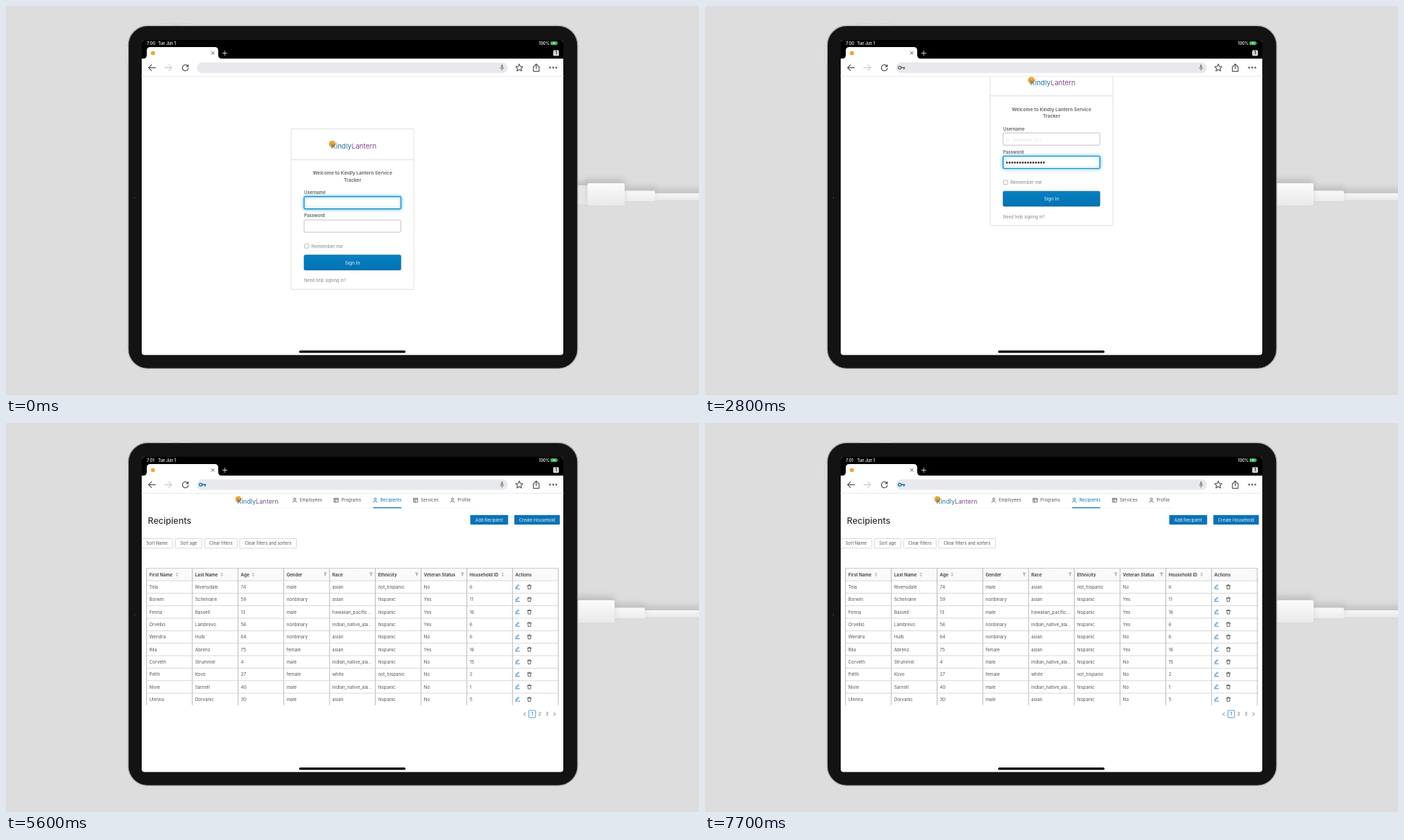
Write an HTML page with a canvas that moves like this. It is 960 px wide and 540 px high and loops after 8 s.

```html
<!DOCTYPE html>
<html lang="en">
<head>
<meta charset="utf-8">
<title>Tablet sign-in and recipients table</title>
<style>
  html, body { margin: 0; width: 100%; height: 100%; overflow: hidden; background: #ddd; }
  canvas { display: block; width: 960px; height: 540px; }
</style>
</head>
<body>
<canvas id="stage" width="960" height="540"></canvas>
<script>
const ctx = document.getElementById('stage').getContext('2d');
const LOOP = 8000, STEP = 700;
const BLUE = '#0b72b5', ORANGE = '#eda63a';

const listed = `Tela Rivensdale 74 male asian not_hispanic No 6
Borwin Schelvane 59 nonbinary asian hispanic Yes 11
Fenna Basvell 13 male hawaiian_pacific... hispanic Yes 16
Orvellio Lambrevo 56 nonbinary indian_native_ala... hispanic Yes 6
Wendra Hulb 64 nonbinary asian hispanic No 6
Rila Abrenz 75 female asian hispanic Yes 16
Corveth Strummel 4 male indian_native_ala... hispanic No 15
Pelth Kovo 27 female white not_hispanic No 2
Nivie Sarnell 40 male indian_native_ala... hispanic No 1
Ulenna Dorvanic 30 male asian hispanic No 5`;
const byLastName = `Rila Abrenz 75 female asian hispanic Yes 16
Keld Acrenthey 121 male white hispanic Yes 11
Fenna Basvell 13 male hawaiian_pacific... hispanic Yes 16
Ombric Basvell 5 male indian_native_ala... hispanic No 9
Marivanna Botrund 54 male indian_native_ala... not_hispanic No 19
Zarnny Celk 80 female white hispanic Yes 2
Dovlings Corvane 13 male asian not_hispanic No 17
Ulenna Dorvanic 30 male asian hispanic No 5
Ombric Dulloway 17 male white not_hispanic No 21
Teov Durvik 114 male white not_hispanic Yes 9`;

function box(x, y, w, h, fill, r = 0, stroke, lw = 1) {
  ctx.beginPath();
  ctx.roundRect(x, y, w, h, r);
  if (fill) { ctx.fillStyle = fill; ctx.fill(); }
  if (stroke) { ctx.strokeStyle = stroke; ctx.lineWidth = lw; ctx.stroke(); }
}

// y is the middle of the capital letters
function text(s, x, y, size, color = '#555', align = 'left', weight = 400) {
  ctx.font = `${weight} ${size}px Inter, "Liberation Sans", sans-serif`;
  ctx.textAlign = align;
  ctx.fillStyle = color;
  ctx.fillText(s, x, y + size * 0.36);
  return ctx.measureText(s).width;
}

function icon(x, y, d, color, lw = 1, filled = false) {
  ctx.save();
  ctx.translate(x, y);
  const path = new Path2D(d);
  ctx.strokeStyle = ctx.fillStyle = color;
  ctx.lineWidth = lw;
  ctx.lineCap = ctx.lineJoin = 'round';
  if (filled) ctx.fill(path); else ctx.stroke(path);
  ctx.restore();
}

function line(x1, y1, x2, y2, color, lw = 1) {
  icon(0, 0, `M${x1} ${y1}L${x2} ${y2}`, color, lw);
}

function dot(x, y, r, color) {
  ctx.beginPath();
  ctx.arc(x, y, r, 0, 7);
  ctx.fillStyle = color;
  ctx.fill();
}

function shade(y, h, top, bottom) {
  const g = ctx.createLinearGradient(0, y, 0, y + h);
  g.addColorStop(0, top);
  g.addColorStop(1, bottom);
  return g;
}

function clipped(x, y, w, h, draw) {
  ctx.save();
  ctx.beginPath();
  ctx.rect(x, y, w, h);
  ctx.clip();
  draw();
  ctx.restore();
}

function brand(x, y, size) {
  dot(x + 1.5, y - 3, size * 0.5, ORANGE);
  const w = text('Kindly', x, y, size, '#28719f');
  text('Lantern', x + w, y, size, '#7c4d86');
}

function cable(shift) {
  ctx.save();
  ctx.translate(-shift, 0);
  ctx.shadowColor = 'rgba(0,0,0,.13)';
  ctx.shadowBlur = 8;
  ctx.shadowOffsetY = -6;
  box(896, 260, 90, 9.5, shade(260, 10, '#f6f6f6', '#e9e9e9'));
  box(855, 256.5, 44, 14.5, shade(256, 15, '#fafafa', '#ececec'), 1.5);
  box(780, 249, 28, 26, '#e6e6e6');
  box(805.5, 246, 51.5, 31, shade(246, 31, '#fbfbfb', '#e9e9e9'), 2);
  ctx.restore();
}

function tablet() {
  for (const x of [213, 240]) box(x, 25, 19, 4, '#e9e9e9', 1, '#c4c4c4', 0.6);
  box(166.3, 55, 4, 25, '#e9e9e9', 1, '#c4c4c4', 0.6);
  box(169.3, 27.3, 622.6, 476, '#131313', 27, '#a6a6a6', 1.2);
  dot(178, 266, 1, '#3a3a3a');
  box(188, 47, 584, 437.5, '#fff', 4);
}

function browser(minute, keyColor) {
  box(188, 47, 584, 26, '#000', [4, 4, 0, 0]);
  text('7:0' + minute, 195, 51.6, 5.5, '#fff', 'left', 500);
  text('Tue Jun 1', 210.5, 51.6, 5.5, '#fff', 'left', 500);
  text('100%', 753, 51.6, 5.5, '#fff', 'right', 500);
  box(754.5, 49.2, 9, 4.8, '#35c759', 1.2, '#777', 0.5);
  box(764.2, 50.7, 0.9, 1.8, '#777');
  icon(759, 51.6, 'M.5-2L-1.4.3H0L-.5 2L1.4-.3H0Z', '#fff', 1, true);

  icon(0, 0, 'M190 73Q195 73 195 68V62Q195 57 200 57H289Q294 57 294 62V68Q294 73 299 73Z', '#fff', 1, true);
  dot(203.5, 65.3, 2.9, ORANGE);
  icon(286.5, 65.3, 'M-1.8-1.8L1.8 1.8M1.8-1.8L-1.8 1.8', '#444', 0.9);
  icon(303, 65.5, 'M-3 0H3M0-3V3', '#ddd', 0.9);
  box(758, 61.2, 8, 8, '#d0d0d0', 1.5);
  text('1', 762, 65.2, 5.8, '#222', 'center', 600);

  box(264.5, 78.3, 430.5, 14.8, '#e8e9ec', 7.4);
  const arrow = 'M5 0H-4.5M-.5-4L-4.5 0L-.5 4';
  icon(202, 85.6, arrow, '#555', 1.2);
  icon(225, 85.6, 'M-5 0H4.5M.5-4L4.5 0L.5 4', '#ccc', 1.2);
  icon(248.5, 85.6, 'M3.6-2A4.2 4.2 0 1 0 4.1 1', '#555', 1.2);
  icon(248.5, 85.6, 'M4.5-4.8V-.8H.5Z', '#555', 1, true);
  if (keyColor) {
    icon(269.8, 85.6, 'M2 0A2 2 0 1 1-2 0A2 2 0 1 1 2 0', keyColor, 1.3);
    icon(272, 85.6, 'M0 0H4.6M3.6 0V1.8', keyColor, 1.5);
  }
  box(685.9, 81.3, 2.4, 5.6, '#888', 1.2);
  icon(687.1, 85.6, 'M-2.5-.3A2.5 2.7 0 0 0 2.5-.3M0 2.4V4', '#888', 0.8);
  icon(711, 85.6, 'M0-5L1.5-1.7L5.1-1.4L2.4 1L3.2 4.6L0 2.7L-3.2 4.6L-2.4 1L-5.1-1.4L-1.5-1.7Z', '#555', 1.1);
  icon(734.5, 85.6, 'M-2-1.8H-4V5H4V-1.8H2M0 1.5V-5M-2.2-3L0-5.2L2.2-3', '#555', 1.1);
  for (const x of [753.7, 758, 762.3]) dot(x, 85.6, 1.25, '#555');
  line(188, 97.5, 772, 97.5, '#e6e6e6', 0.8);
}

function field(y, focused) {
  ctx.save();
  if (focused) { ctx.shadowColor = '#45b4ec'; ctx.shadowBlur = 4; }
  box(413, y, 134, 17, '#fff', 1.5, focused ? '#1688c2' : '#bdbdbd', focused ? 1.2 : 0.9);
  ctx.restore();
}

function login(dy, bottom, mode) {
  clipped(188, 98, 584, bottom - 98, () => {
    ctx.translate(0, dy);
    box(395, 170.5, 170, 222.8, '#fff', 1, '#e0e0e0', 1);
    line(395, 213.3, 565, 213.3, '#d9d9d9', 0.9);
    brand(450.5, 194.6, 9.6);
    text('Welcome to Kindly Lantern Service', 480, 231.7, 6.5, '#5e5e5e', 'center', 600);
    text('Tracker', 480, 241.2, 6.5, '#5e5e5e', 'center', 600);
    text('Username', 413, 259, 6, '#5e5e5e', 'left', 600);
    text('Password', 413, 291, 6, '#5e5e5e', 'left', 600);
    field(264.7, mode !== 'filled');
    field(297, mode === 'filled');
    if (mode === 'typing') line(417.3, 269.5, 417.3, 277, '#333', 0.8);
    if (mode === 'filled') {
      text('jo. vellandier_oru', 416.5, 274, 6.2, '#e6e6e6');
      for (let i = 0; i < 15; i++) dot(418.3 + i * 3.65, 305.9, 1.3, '#333');
    }
    box(413.4, 330.4, 5.8, 5.8, '#fff', 0.8, '#aaa', 0.8);
    text('Remember me', 423, 333.4, 6.4, '#858585');
    box(413, 345.7, 134, 20.8, shade(345, 21, '#0a80c2', '#0073b2'), 1.5, '#0a699f', 0.8);
    text('Sign In', 480, 356.2, 6.4, '#e8f4fb', 'center');
    text('Need help signing in?', 413, 381, 5.7, '#858585');
  });
}

function key(x, y, w, h, fill = '#fff') {
  box(x, y + 1, w, h, '#8b8e95', 3);
  box(x, y, w, h, fill, 3);
}

// A two-character label puts the shifted sign above the plain one.
function keys(labels, center, y, h, size, gap) {
  labels.split(' ').forEach((s, i) => {
    const x = center + i * 40.17, mid = y + h / 2;
    key(x - 18.2, y, 36.4, h);
    if (s.length === 1) return text(s, x, mid - 0.5, 13.5, '#111', 'center');
    text(s[0], x, mid - gap, size, '#111', 'center');
    text(s[1], x, mid + gap, size, '#111', 'center');
  });
}

function wideKey(label, x, y, w, h, align, fill = '#b2b7c2', color = '#222') {
  key(x, y, w, h, fill);
  text(label, align === 'left' ? x + 7 : x + w - 7, y + h - 9, 8, color, align);
}

function keyboard() {
  clipped(188, 296, 584, 188.5, () => {
    box(188, 296, 584, 190, '#d2d5dc');
    icon(203, 308, 'M-1.5-3.5L-4-1L-1.5 1.5M-4-1H1.5A2.3 2.3 0 0 1 1.5 3.6H-2', '#979aa0', 0.9);
    icon(221.5, 308, 'M1.5-3.5L4-1L1.5 1.5M4-1H-1.5A2.3 2.3 0 0 0-1.5 3.6H2', '#979aa0', 0.9);
    box(238.8, 303, 6.5, 8, '#111', 1);
    box(237, 305.5, 5.5, 7.5, '#111', 1, '#d2d5dc', 0.8);

    keys('~` !1 @2 #3 $4 %5 ^6 &7 *8 (9 )0 _- +=', 208.2, 323.5, 25, 8.8, 5);
    wideKey('delete', 712, 323.5, 58, 25, 'right');
    wideKey('tab', 190, 352, 57, 33, 'left');
    keys('q w e r t y u i o p {[ }] |\\', 269.5, 352, 33, 11, 7.2);
    wideKey('caps lock', 190, 389.5, 67, 33.5, 'left');
    keys('a s d f g h j k l :; "\'', 279.2, 389.5, 33.5, 11, 7.2);
    wideKey('go', 702.7, 389.5, 67.3, 33.5, 'right', '#007aff', '#fff');
    wideKey('shift', 190, 427, 87, 33.5, 'left');
    keys('z x c v b n m <, >. ?/', 299, 427, 33.5, 11, 7.2);
    wideKey('shift', 683, 427, 87, 33.5, 'right');
    for (const [x, w] of [[190, 53.5], [247.7, 53], [304.7, 52.5], [602.3, 82], [688, 82]])
      key(x, 464.8, w, 30, '#b2b7c2');
    key(361, 464.8, 237.5, 30);
    for (const x of [203, 316]) icon(x, 487, 'M-4 0A4 4 0 0 1 4 0', '#222', 0.9);
  });
}

const carets = { up: 'M-1.9 0L0-2.2L1.9 0Z', down: 'M-1.9 0L0 2.2L1.9 0Z' };
const person = 'M1.4-1.6A1.5 1.5 0 1 1-1.6-1.6A1.5 1.5 0 1 1 1.4-1.6M-2.7 2.9A2.7 2.5 0 0 1 2.6 2.9';
const sheet = 'M-2.7-2.7H2.7V2.7H-2.7ZM-2.7-1H2.7M-.8-1V2.7';

function button(label, x, w) {
  box(x, 160.5, w, 13.3, '#fff', 1, '#d0d0d0', 0.8);
  text(label, x + w / 2, 167.2, 5.85, '#555', 'center');
}

function navBar() {
  brand(320.5, 108.8, 8.7);
  const items = [['Employees', 407, person], ['Programs', 464.5, sheet], ['Recipients', 518.5, person],
    ['Services', 574.5, sheet], ['Profile', 625.5, person]];
  for (const [label, x, shape] of items) {
    const color = label === 'Recipients' ? BLUE : '#555';
    icon(x - 7, 107.2, shape, color, 0.8);
    text(label, x, 107.2, 6, color);
  }
  line(312, 117.8, 648, 117.8, '#f2f2f2', 0.8);
  line(509, 117.6, 547.3, 117.6, BLUE, 1.1);
}

function table(data, sorted) {
  const left = 194.7, top = 201.7, colW = 63.38, rowH = 17.34, first = 219;
  const colX = i => left + i * colW;
  box(left, top, 570.4, 17.3, '#fafafa');
  if (sorted) {
    box(colX(1), top, colW, 17.3, '#f1f1f1');
    box(colX(1), first, colW, 172.4, '#fafafa');
  }
  for (let i = 0; i < 10; i++) {
    line(left, first + i * rowH, 765, first + i * rowH, '#d3d3d3', 0.9);
    line(colX(i), top, colX(i), 391.3, '#b3b3b3', 0.9);
  }
  line(left, top, 765, top, '#c4c4c4', 0.9);

  const heads = ['First Name', 'Last Name', 'Age', 'Gender', 'Race', 'Ethnicity', 'Veteran Status', 'Household ID', 'Actions'];
  heads.forEach((s, i) => text(s, colX(i) + 3.8, 210.3, 6.15, '#3a3a3a', 'left', 600));
  [237, 299, 342.5, 688].forEach((x, i) => {
    icon(x, 209.7, carets.up, sorted && i === 1 ? BLUE : '#bbb', 1, true);
    icon(x, 211, carets.down, '#bbb', 1, true);
  });
  for (let i = 3; i < 7; i++)
    icon(colX(i + 1) - 5.9, 210, 'M-2.5-2.4H2.5L.8 0V2.4H-.8V0Z', '#b5b5b5', 1, true);

  data.split('\n').forEach((row, r) => {
    const y = 227.6 + r * rowH;
    row.split(' ').forEach((s, i) => text(s, colX(i) + 3.8, y, 6.2));
    icon(708.5, y - 0.3, 'M-2 1L-1.6-.4L1.2-2.9L2.2-1.9L-.6.7ZM-2.8 2.8H2.8', BLUE, 0.8);
    icon(725, y, 'M-2.7-1.8H2.7M-2-1.8L-1.8 2.8H1.8L2-1.8M-1-1.9V-2.9H1V-1.9', '#444', 0.8);
  });
}

function recipients(sorted) {
  navBar();
  text('Recipients', 196.5, 135.8, 12.1, '#333', 'left', 500);
  for (const [label, x, w] of [['Add Recipient', 643.2, 52.4], ['Create Household', 704.2, 63]]) {
    box(x, 127.7, w, 13.3, BLUE, 0.8);
    text(label, x + w / 2, 134.4, 5.85, '#e9f3fa', 'center');
  }
  clipped(188, 150, 584, 40, () => {
    button('Sort Name', 187.5, 43.5);
    button('Sort age', 234.5, 37);
    button('Clear filters', 275.2, 45.2);
    button('Clear filters and sorters', 323.8, 78.6);
  });
  table(sorted ? byLastName : listed, sorted);
  if (sorted) {
    box(253, 182.7, 73.6, 13.8, '#404040', 1);
    icon(290, 196.4, 'M-2.6 0H2.6L0 2.4Z', '#404040', 1, true);
    text('Click to sort descending', 289.8, 189.7, 5.85, '#eee', 'center');
  }
  icon(718.5, 404.2, 'M1.2-2L-1.2 0L1.2 2', '#666', 0.8);
  box(724.3, 399, 9.4, 10, '#fff', 0.8, '#4b93c4', 0.9);
  text('1', 729, 404.1, 6, BLUE, 'center', 500);
  text('2', 739.4, 404.1, 6, '#555', 'center');
  text('3', 749.4, 404.1, 6, '#555', 'center');
  icon(760, 404.2, 'M-1.2-2L1.2 0L-1.2 2', '#666', 0.8);
}

function draw(now) {
  const step = Math.floor((now % LOOP) / STEP);
  box(0, 0, 960, 540, '#ddd');
  cable([0, 7, 11, 14][Math.min(step, 3)]);
  tablet();
  if (step < 3) login(0, 484, 'empty');
  else if (step === 3) login(-82.5, 277, 'typing');
  else if (step < 6) login(-88.5, 484, 'filled');
  else recipients(step === 9);
  if (step === 3) keyboard();
  browser(step < 6 ? 0 : 1, step < 4 ? null : step < 6 ? '#666' : BLUE);
  box(406, 478.3, 147.5, 3.2, '#000', 1.6);
}

let start;
function tick(now) {
  start ??= now;
  draw(now - start);
  requestAnimationFrame(tick);
}
draw(0);
requestAnimationFrame(tick);
</script>
</body>
</html>
```
